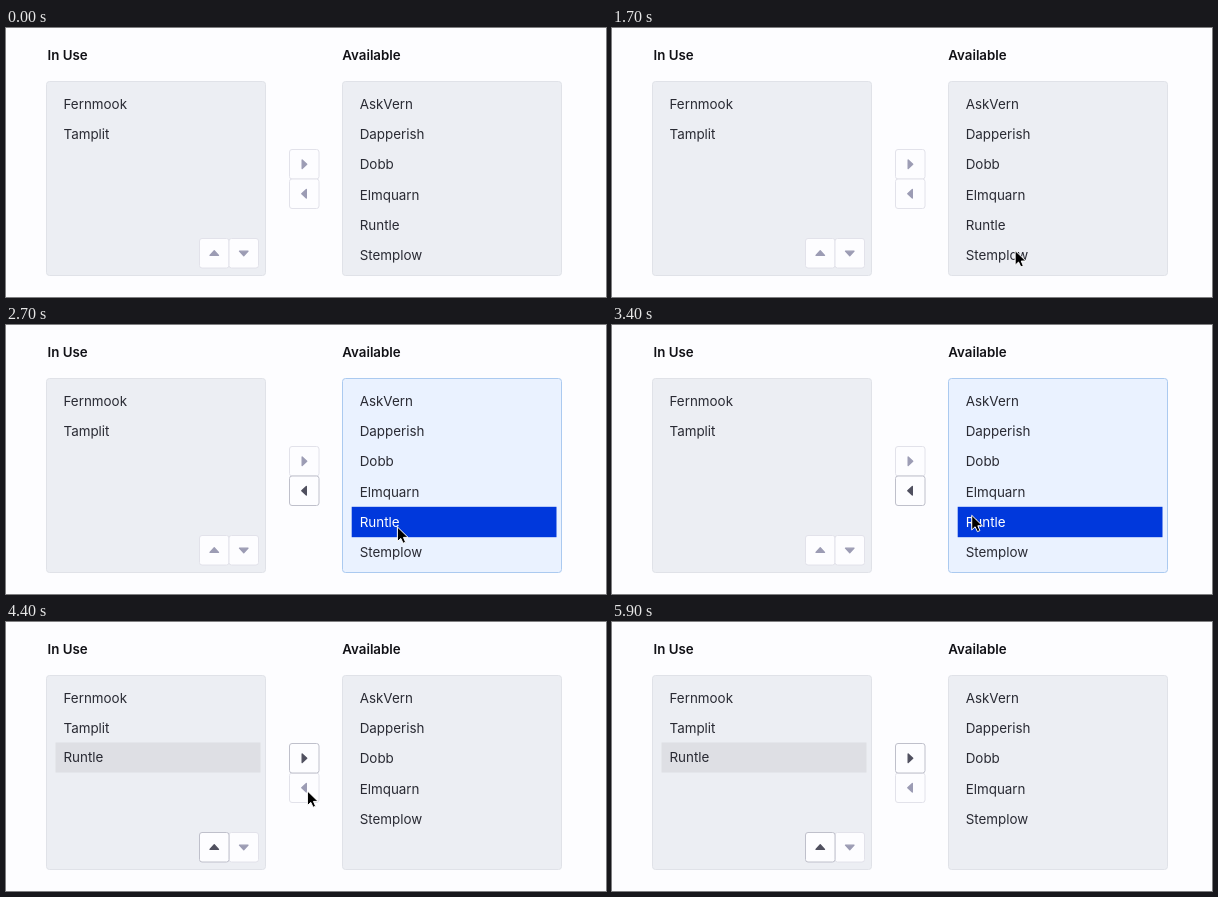
These frames come from a looping animation (600x269 px, 7300 ms). An HTML page:

```html
<!DOCTYPE html>
<html lang="en">
<head>
<meta charset="utf-8">
<title>Moving an item between lists</title>
<style>
  html, body { margin: 0; width: 100%; height: 100%; overflow: hidden; background: #fdfdff; }
  svg { display: block; }
  text { font: 13.4px Inter, sans-serif; fill: #292a33; }
  .head { font-weight: 600; font-size: 13.3px; fill: #111116; }
  .white { fill: #fff; }
  .box { fill: #eceef3; stroke: #e0e2e8; }
  .box.focus { fill: #eaf2ff; stroke: #abcaf0; }
  .btn { fill: #fdfdff; stroke: #e2e2ea; }
  .btn.on { stroke: #bfc0cb; }
  .tri { fill: #9c9cb4; stroke: #9c9cb4; stroke-width: 1.3; stroke-linejoin: round; }
  .tri.on { fill: #50505f; stroke: #50505f; }
</style>
</head>
<body>
<svg width="600" height="269" viewBox="0 0 600 269">
  <g id="scene"></g>
  <path id="cursor" d="M.4 .9V15.6L3.8 12.4L6.1 17.3L8.6 16.2L6.5 11.4H11.1Z"
    stroke="#fff" stroke-linejoin="round"/>
</svg>
<script>
const LOOP = 7300, STEP = 100;
const SHOW = 1000, SELECT = 2600, MOVE = 4400, HIDE = 5900;
const PITCH = 30.3, SIZE = 29.5;
const used = ['Fernmook', 'Tamplit'];
const free = ['AskVern', 'Dapperish', 'Dobb', 'Elmquarn', 'Runtle', 'Stemplow'];
const picked = 4;

const easeIn = k => k * k;
const easeOut = k => k * (2 - k);
const smooth = k => k * k * (3 - 2 * k);

// Pointer stops and the moves that join them
const entry = [420, 252], item = [391, 201], button = [301, 168], exit = [319, 236];
const moves = [
  { start: 1300, end: 2400, from: entry, to: item, ease: easeOut },
  { start: 2900, end: 4150, from: item, to: button, ease: smooth },
  { start: 5300, end: 5800, from: button, to: exit, ease: easeIn }
];

const scene = document.getElementById('scene');
const cursor = document.getElementById('cursor');

const label = (x, y, s, name = '') => `<text x="${x}" y="${y}" class="${name}">${s}</text>`;
const rect = (x, y, w, h, attr) =>
  `<rect x="${x}" y="${y}" width="${w}" height="${h}" ${attr}/>`;

const panel = (x, focus) =>
  rect(x + .5, 53.5, 219, 194, `rx="3" class="box ${focus ? 'focus' : ''}"`);

const rows = (x, items, chosen) => items.map((s, i) =>
  label(x, 80.7 + i * PITCH, s, i === chosen ? 'white' : '')).join('');

// Two joined buttons; an enabled one is drawn last so its border stays whole
function pair(x, y, vertical, angle, enabled) {
  const shape = i => {
    const on = enabled === i ? 'on' : '';
    const bx = x + (vertical ? 0 : SIZE * i), by = y + (vertical ? SIZE * i : 0);
    return rect(bx, by, SIZE, SIZE, `rx="2.5" class="btn ${on}"`) +
      `<path class="tri ${on}" d="M-2.1 -4.3L2.5 0L-2.1 4.3Z"
        transform="translate(${bx + SIZE / 2} ${by + SIZE / 2}) rotate(${angle + 180 * i})"/>`;
  };
  return enabled === 0 ? shape(1) + shape(0) : shape(0) + shape(1);
}

function draw(stage) {
  const active = stage === 1, moved = stage === 2;
  const right = moved ? free.filter((_, i) => i !== picked) : free;
  scene.innerHTML =
    label(41.5, 32.3, 'In Use', 'head') + label(336.3, 32.3, 'Available', 'head') +
    panel(40) + panel(336, active) +
    (moved ? rect(49.5, 120.5, 205, 30, 'fill="#dedfe4"') +
      label(57.5, 140.2, free[picked]) : '') +
    (active ? rect(345.7, 181.8, 204.8, 30.4, 'fill="#0038dc"') : '') +
    rows(57.5, used) + rows(353.7, right, active ? picked : -1) +
    pair(283.5, 121.5, true, 0, active ? 1 : moved ? 0 : -1) +
    pair(193.5, 210.5, false, -90, moved ? 0 : -1);
}

function pointer(t) {
  const { start, end, from, to, ease } = moves.findLast(m => t >= m.start) || moves[0];
  const k = ease(Math.min(1, Math.max(0, (t - start) / (end - start))));
  return from.map((v, i) => v + (to[i] - v) * k);
}

let shown = -1;
function frame() {
  const t = Math.floor(performance.now() % LOOP / STEP) * STEP;
  const stage = t < SELECT ? 0 : t < MOVE ? 1 : 2;
  if (stage !== shown) draw(shown = stage);
  cursor.style.display = t >= SHOW && t < HIDE ? '' : 'none';
  cursor.setAttribute('transform', `translate(${pointer(t)})`);
  requestAnimationFrame(frame);
}
frame();
</script>
</body>
</html>
```
